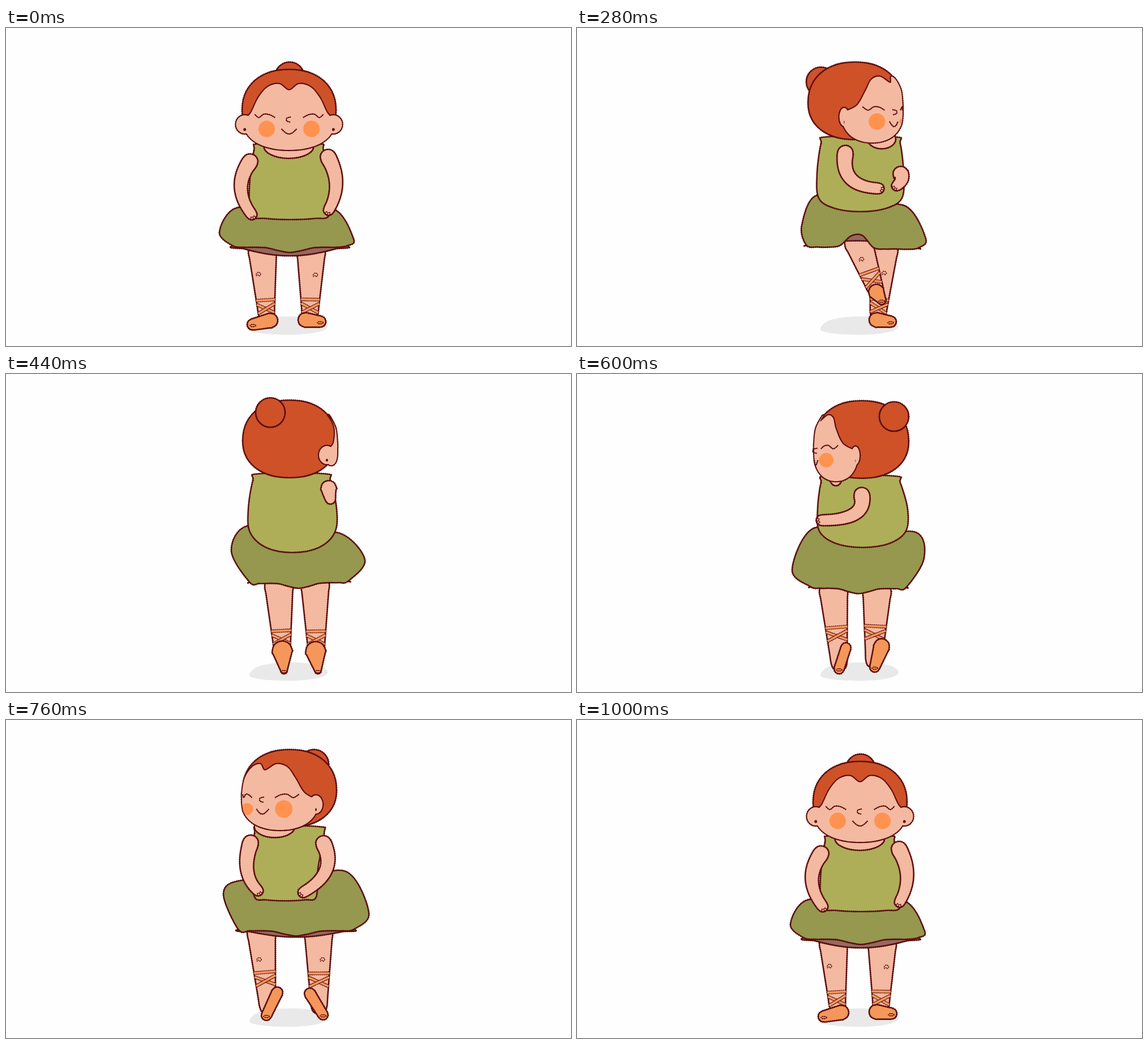
Animation, 998 px wide and 561 px high, one loop 1040 ms. Source, as an HTML page with a canvas:

```html
<!DOCTYPE html>
<html lang="en">
<head>
<meta charset="utf-8">
<title>Pirouette</title>
<style>
html, body { margin: 0; width: 100%; height: 100%; overflow: hidden; background: #fefefe; }
canvas { display: block; }
</style>
</head>
<body>
<canvas width="998" height="561"></canvas>
<script>
const ctx = document.querySelector('canvas').getContext('2d');
const { PI, sin, cos, abs, min, max, exp, sign, atan2 } = Math;
const LOOP = 1040, STEP = 40;
const INK = '#5a0d0e', HAIR = '#cf5128', SKIN = '#f4b9a1', BLUSH = '#ff924f',
  TOP = '#aeae59', SKIRT = '#96984f', LINING = '#96695f', SHOE = '#f5975a', SHADOW = '#e9e9e9';

// Key poses. head and bun: centre. body: shoulder x, belly x, top, side and bottom y.
// skirt: waist, side, hem | hem, side, waist. lift: knee x and height. arm: shoulder, elbow, hand.
// leg: hip, ankle. shoe: heel, toe, two radii.
const front = {
  head: [500, 177], bun: [501, 86], body: [438, 561, 430, 574, 204, 330, 338],
  skirt: [408, 317, 377, 360, 400, 384, 603, 384, 614, 372, 578, 319], lift: [450, 0], lining: [18],
  armL: [431, 236, 415, 282, 434, 329], armR: [569, 228, 583, 275, 570, 321],
  legL: [453, 392, 460, 505], shoeL: [467, 516, 436, 523, 13, 10],
  legR: [539, 394, 537, 505], shoeR: [529, 515, 555, 518, 13, 10]
};
const poses = [
  [0, { yaw: [0], ...front }],
  [160, {
    yaw: [.62], head: [492, 168], bun: [447, 90], body: [440, 567, 455, 573, 198, 314, 328],
    skirt: [424, 295, 380, 365, 395, 392, 602, 390, 616, 377, 584, 310], lift: [472, 27], lining: [-10],
    armL: [442, 227, 440, 270, 482, 311], armR: [573, 224, 583, 262, 566, 306],
    legL: [471, 382, 505, 458], shoeL: [500, 458, 514, 462, 13, 10],
    legR: [536, 390, 535, 505], shoeR: [529, 515, 555, 518, 13, 10]
  }],
  [280, {
    yaw: [.97], head: [491, 164], bun: [431, 95], body: [431, 571, 424, 577, 192, 300, 324],
    skirt: [424, 295, 397, 348, 405, 383, 603, 388, 616, 371, 580, 314], lift: [496, 36], lining: [-10],
    armL: [474, 221, 484, 266, 533, 283], armR: [572, 258, 573, 268, 565, 278],
    legL: [497, 377, 527, 460], shoeL: [529, 466, 538, 480, 14, 8],
    legR: [542, 390, 532, 503], shoeR: [529, 515, 554, 518, 13, 10]
  }],
  [440, {
    yaw: [2.1], head: [501, 150], bun: [467, 68], body: [436, 573, 428, 584, 176, 279, 315],
    skirt: [426, 268, 398, 312, 430, 367, 605, 365, 634, 328, 590, 281], lift: [490, 0], lining: [-10],
    armL: [570, 202, 571, 210, 573, 220], armR: [448, 205, 448, 213, 448, 222],
    legL: [482, 372, 488, 490], shoeL: [488, 489, 491, 523, 18, 6],
    legR: [546, 370, 548, 490], shoeR: [547, 490, 551, 523, 18, 6]
  }],
  [520, { bun: [514, 59] }],
  [600, {
    yaw: [4.95], head: [503, 151], bun: [560, 75], body: [431, 571, 425, 584, 180, 277, 306],
    skirt: [418, 272, 380, 345, 412, 375, 582, 376, 613, 325, 598, 279], lift: [490, 0], lining: [-10],
    armL: [445, 212, 445, 222, 448, 232], armR: [503, 214, 490, 247, 432, 258],
    legL: [453, 380, 463, 510], shoeL: [475, 483, 463, 520, 9, 9],
    legR: [530, 382, 524, 505], shoeR: [538, 481, 526, 517, 14, 9]
  }],
  [680, { skirt: [414, 277, 363, 328, 408, 372, 600, 374, 627, 332, 590, 270] }],
  [760, {
    yaw: [5.67], head: [501, 156], bun: [544, 78], body: [439, 562, 436, 551, 188, 312, 319],
    skirt: [415, 283, 384, 306, 410, 369, 615, 369, 641, 340, 600, 267], lift: [470, 0], lining: [14],
    armL: [432, 217, 426, 265, 445, 301], armR: [561, 218, 565, 265, 525, 304],
    legL: [451, 373, 462, 505], shoeL: [479, 481, 460, 521, 10, 9],
    legR: [552, 373, 553, 505], shoeR: [537, 483, 560, 520, 10, 9]
  }],
  [840, { skirt: [412, 300, 381, 325, 404, 375, 632, 376, 661, 350, 600, 286] }],
  [1000, { yaw: [2 * PI], ...front }]
];

let now = 0, yaw = 0;
const mix = (p, q, u) => p.map((v, i) => v + (q[i] - v) * u);
const shift = ([x, y], angle, r) => [x + r * cos(angle), y + r * sin(angle)];
const range = (n, f) => Array.from({ length: n + 1 }, (_, i) => f(i / n));
const pairs = list => list.flatMap((x, i) => i % 2 ? [] : [[x, list[i + 1]]]);

function get(name) {
  const keys = poses.filter(([, pose]) => pose[name]);
  const i = keys.findLastIndex(([time]) => time <= now);
  const [t0, a] = keys[i], [t1, b] = keys[i + 1] || keys[i];
  return mix(a[name], b[name], (now - t0) / (t1 - t0 || 1));
}

function curve(pts, closed) {
  const path = new Path2D(), n = pts.length;
  const at = i => pts[closed ? (i + n) % n : max(0, min(n - 1, i))];
  path.moveTo(...pts[0]);
  for (let i = 0; i < n - (closed ? 0 : 1); i++) {
    const [a, b, c, d] = [at(i - 1), at(i), at(i + 1), at(i + 2)];
    path.bezierCurveTo(b[0] + (c[0] - a[0]) / 6, b[1] + (c[1] - a[1]) / 6,
      c[0] - (d[0] - b[0]) / 6, c[1] - (d[1] - b[1]) / 6, ...c);
  }
  if (closed) path.closePath();
  return path;
}

function oval(x, y, rx, ry = rx) {
  const path = new Path2D();
  path.ellipse(x, y, rx, ry, 0, 0, 2 * PI);
  return path;
}

// Solid line with a fine broken edge, like a crayon.
function ink(path, width = 2.2) {
  ctx.strokeStyle = INK;
  ctx.lineWidth = width;
  ctx.stroke(path);
  ctx.lineWidth = width + 1;
  ctx.setLineDash([1.3, 2.2]);
  ctx.stroke(path);
  ctx.setLineDash([]);
}

function fill(path, color) {
  ctx.fillStyle = color;
  ctx.fill(path);
}

function paint(path, color) {
  fill(path, color);
  ink(path);
}

// Tapered tube along the curve a - m - b.
function limb(a, m, b, r0, r1) {
  const bend = m.map((v, i) => 2 * v - (a[i] + b[i]) / 2);
  const left = [], right = [];
  const angle = u => {
    const [x, y] = mix(mix(bend, a, 1).map((v, i) => bend[i] - v), b.map((v, i) => v - bend[i]), u);
    return atan2(y, x);
  };
  range(8, u => {
    const p = mix(mix(a, bend, u), mix(bend, b, u), u), r = r0 + (r1 - r0) * u;
    left.push(shift(p, angle(u) - PI / 2, r));
    right.unshift(shift(p, angle(u) + PI / 2, r));
  });
  const cap = (p, dir, r) => [-.8, 0, .8].map(t => shift(p, dir + t, r));
  return curve([...left, ...cap(b, angle(1), r1), ...right, ...cap(a, angle(0) + PI, r0)], true);
}

function leg(name, side) {
  const [hip, ankle] = pairs(get('leg' + name));
  const [heel, toe, [r0, r1]] = pairs(get('shoe' + name));
  paint(limb(hip, mix(hip, ankle, .5), ankle, 25, 14), SKIN);

  // Ribbons wind round the leg at fixed heights above the heel.
  const across = atan2(ankle[1] - hip[1], ankle[0] - hip[0]) - PI / 2;
  const edge = (height, dir) => {
    const u = (heel[1] - height - hip[1]) / (ankle[1] - hip[1]);
    return shift(mix(hip, ankle, u), across, dir * (25 - 11 * u));
  };
  for (const [l, r] of [[36, 36], [29, 13], [13, 29]]) {
    const band = curve([edge(l, -1), edge(r, 1)]);
    ink(band, 5.6);
    ctx.strokeStyle = SHOE;
    ctx.lineWidth = 3.8;
    ctx.stroke(band);
  }

  paint(limb(heel, mix(heel, toe, .5), toe, r0, r1), SHOE);
  ink(oval(toe[0], toe[1] + 2, 5, 2), 1);
  if (cos(yaw) < .3) return;
  const [x, y] = mix(hip, ankle, .38);
  ink(curve(range(8, u => shift([x + side * 9 * cos(yaw), y], 2.5 + 7 * u, 5 - 3.5 * u))), .9);
}

function skirt() {
  const [waistL, sideL, hemL, hemR, sideR, waistR] = pairs(get('skirt'));
  const [knee, height] = get('lift'), [depth] = get('lining');
  const hem = drop => range(10, u => {
    const [x, y] = mix(hemL, hemR, u);
    return [x, y + drop(u, x)];
  });
  const [x, y] = mix(hemL, hemR, .5), [wx, wy] = mix(waistL, waistR, .5);
  paint(curve([...hem(u => depth * sin(PI * u)), [x, y - 30]], true), LINING);
  const wave = (u, x) => sin(PI * u) * (8 + 4 * cos(4 * PI * u)) - height * exp(-(((x - knee) / 22) ** 2));
  paint(curve([waistL, sideL, ...hem(wave), sideR, waistR, [wx, wy + 10]], true), SKIRT);
}

function body() {
  const [shL, shR, beL, beR, top, side, bottom] = get('body');
  const belly = top + (side - top) * .6, low = side + (bottom - side) * .75;
  const across = u => beL + (beR - beL) * u;
  paint(curve([
    [shL, top + 12], [shL + 10, top], [shR - 10, top], [shR, top + 12], [beR, belly], [beR - 3, side],
    [across(.8), low], [across(.5), bottom], [across(.2), low], [beL + 3, side], [beL, belly]
  ], true), TOP);
  const [, y] = get('head'), facing = cos(yaw);
  if (facing > 0)
    paint(oval((shL + shR) / 2 + 45 * sin(yaw), y + 32, 44 * max(.25, facing), 12 + 9 * facing), SKIN);
}

const armIsBehind = side => cos(yaw + side * .8) < -.3;

function arm(name) {
  const [shoulder, elbow, hand] = pairs(get('arm' + name));
  paint(limb(shoulder, elbow, hand, 14, 9.5), SKIN);
  if (cos(yaw) < -.2) return;
  const dir = atan2(hand[1] - elbow[1], hand[0] - elbow[0]);
  for (const turn of [-.6, 0, .6])
    ink(curve([shift(hand, dir + turn, 9), shift(hand, dir + turn, 4)]), 1.4);
}

// The head is a rounded solid; everything on it turns with the yaw.
function head() {
  const [cx, cy] = get('head'), bulge = 2.2, R = 84;
  const round = v => sign(v) * abs(v) ** (2 / bulge);
  const clampTurn = a => max(-PI / 2, min(PI / 2, a + yaw));
  const spot = (a, dy) => {
    const rise = max(0, -32 - dy) / 72;
    return [cx + R * (1 - rise ** bulge) ** (1 / bulge) * sin(clampTurn(a)), cy + dy];
  };
  const bun = () => paint(oval(...get('bun'), 26), HAIR);
  const bunInFront = cos(yaw) < .3;

  if (!bunInFront) bun();
  paint(curve(range(27, u => {
    const a = u * 2 * PI * 27 / 28;
    return [cx + (R - 1) * round(cos(a)), cy - 32 + (sin(a) < 0 ? 72 : 65) * round(sin(a))];
  }), true), HAIR);
  if (abs(yaw) < 2.6) face();
  if (bunInFront) bun();

  function face() {
    const half = [[1.18, -16], [.92, -28], [.73, -54], [.55, -73], [.26, -78]];
    const hairline = [...half.map(([a, y]) => [-a, y]), [0, -67], ...half.reverse()];
    const [left, y] = spot(-1.25, -10), [right] = spot(1.25, -10);
    const w = (right - left) / 2;
    const jaw = range(12, u => [left + w + w * round(cos(PI * u)), y + min(48, 2 * w) * round(sin(PI * u))]);
    const skin = curve([...hairline.map(p => spot(...p)), ...jaw], true);
    const ears = [-1.2, 1.2].filter(a => cos(a + yaw) > 0);
    const earPath = a => oval(...spot(a, -7), 6 + 10 * abs(sin(a + yaw)), 16);

    // Outline first, fill after, so that ears and face melt into one shape.
    const parts = [skin, ...ears.map(earPath)];
    parts.forEach(p => ink(p, 3.8));
    parts.forEach(p => fill(p, SKIN));
    ears.forEach(a => fill(oval(...spot(a, 2), 2.6 * abs(sin(a + yaw)), 2.6), INK));

    ctx.save();
    ctx.clip(skin);
    for (const side of [-1, 1]) {
      const facing = cos(side * .49 + yaw);
      if (facing <= 0) continue;
      fill(oval(...spot(side * .49, 1), 15.5 * facing ** .5), BLUSH);
      const eye = [[.3, -19], [.42, -24], [.56, -25], [.69, -19], [.81, -25]];
      ink(curve(eye.map(([a, dy]) => spot(side * a, dy))), 1.6);
    }
    ctx.restore();
    if (cos(yaw) < 0) return;
    const s = yaw > 0 ? 1 : -1, [nx, ny] = spot(0, -15);
    ink(curve([[nx - 3 * s, ny - 5], [nx + 4 * s, ny - 3], [nx + 4 * s, ny + 2], [nx - 2 * s, ny + 4]]), 1.4);
    ink(curve(range(6, u => spot(.32 * u - .16, 1 + 9 * sin(PI * u)))), 1.6);
  }
}

function draw(ms) {
  now = min(1000, Math.floor(ms % LOOP / STEP) * STEP);
  const [turn] = get('yaw');
  yaw = atan2(sin(turn), cos(turn));
  fill(oval(499, 280, 2000), '#fefefe');
  fill(curve([[430, 530], [443, 517], [475, 510], [515, 509], [552, 514], [568, 525], [556, 535], [515, 541], [465, 540], [437, 536]], true), SHADOW);
  leg('R', 1);
  leg('L', -1);
  skirt();
  const arms = [['R', 1], ['L', -1]];
  arms.forEach(([name, side]) => armIsBehind(side) && arm(name));
  body();
  arms.forEach(([name, side]) => armIsBehind(side) || arm(name));
  head();
}

ctx.lineJoin = 'round';
const start = performance.now();
function tick() {
  draw(performance.now() - start);
  requestAnimationFrame(tick);
}
tick();
</script>
</body>
</html>
```
